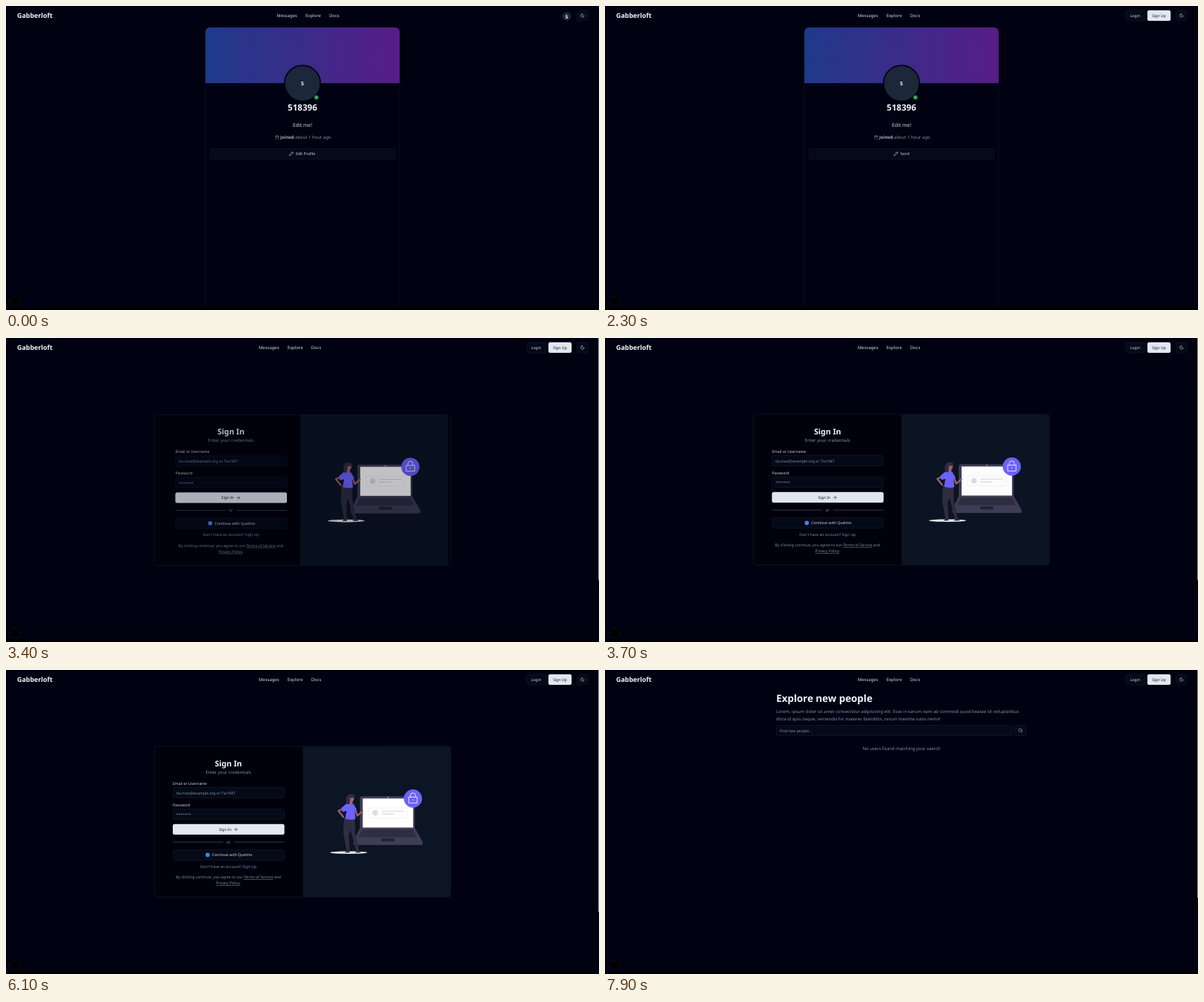
Write an HTML page that moves like this. It is 800x410 px and loops after 8 s.

```html
<!DOCTYPE html>
<html lang="en">
<head>
<meta charset="utf-8">
<title>Gabberloft</title>
<style>
html, body { margin: 0; width: 100%; height: 100%; overflow: hidden; background: #010211; }
svg { display: block; width: 100vw; height: 100vh; }
text { font: 5.93px "Noto Sans", "Open Sans", sans-serif; fill: #8290a6; text-rendering: geometricPrecision; white-space: pre; }
.mid { text-anchor: middle; }
.xs { font-size: 5.13px; }
.md { font-size: 5.15px; font-weight: 500; }
.bold { font-weight: 700; fill: #f4f7fb; }
.lite { fill: #d3d8e2; }
.dark { fill: #141b2c; }
.dim { fill: #66738a; }
.line { text-decoration: underline; }
.box { fill: #050a18; stroke: #141c2e; stroke-width: .6; }
.pale { fill: #e2e8f0; }
.icon { fill: none; stroke: #d3d8e2; stroke-width: 2; stroke-linecap: round; stroke-linejoin: round; }
</style>
</head>
<body>
<svg viewBox="0 0 800 410" preserveAspectRatio="none">
  <defs>
    <linearGradient id="cover"><stop stop-color="#1e3a8a"/><stop offset="1" stop-color="#581c87"/></linearGradient>
    <path id="pencil" class="icon" d="M17 3a2.85 2.83 0 1 1 4 4L7.500 20.500 2 22l1.500-5.500ZM15 5l4 4"/>
  </defs>
  <rect width="800" height="410" fill="#010211"/>

  <g id="profile">
    <path d="M269 410V35a6 6 0 0 1 6-6H525a6 6 0 0 1 6 6V410" fill="none" stroke="#0c1222" stroke-width=".8"/>
    <path d="M269 104V35a6 6 0 0 1 6-6H525a6 6 0 0 1 6 6V104Z" fill="url(#cover)"/>
    <circle cx="400" cy="104.300" r="24.200" fill="#1c2839" stroke="#010211" stroke-width="1.700"/>
    <text class="bold mid" x="400" y="106.800" style="font-size:6.8px">5</text>
    <circle cx="418.700" cy="123.300" r="3" fill="#22b858" stroke="#010211" stroke-width=".6"/>
    <text class="bold mid" x="400" y="141" style="font-size:11.6px">518396</text>
    <text class="mid lite" x="400" y="162.500" style="font-size:6.8px">Edit me!</text>
    <g class="icon" transform="translate(363 174.200) scale(.23)" style="stroke:#8290a6">
      <rect x="3" y="4" width="18" height="18" rx="2"/><path d="M3 10h18M8 2v4M16 2v4"/>
    </g>
    <text x="370" y="179"><tspan font-weight="600" fill="#a4afc0">Joined</tspan> about 1 hour ago</text>
    <rect class="box" x="275.500" y="192.500" width="249.300" height="14" rx="2.500"/>
    <g id="edit">
      <use href="#pencil" transform="translate(381.700 196.200) scale(.265)"/>
      <text class="md lite" x="391" y="201.300">Edit Profile</text>
    </g>
    <g id="send">
      <use href="#pencil" transform="translate(389.300 196.200) scale(.265)"/>
      <text class="md lite" x="398.500" y="201.300">Send</text>
    </g>
  </g>

  <g id="login">
    <rect x="200.300" y="103" width="399.700" height="203.300" rx="4" fill="#01010b" stroke="#131a2a" stroke-width=".7"/>
    <g id="form">
      <text class="bold mid" x="300" y="130" style="font-size:10.6px">Sign In</text>
      <text class="mid" x="300" y="139.700">Enter your credentials</text>
      <text class="xs lite" x="225" y="154.700">Email or Username</text>
      <rect class="box" x="225.200" y="158.500" width="150.300" height="14" rx="2.500"/>
      <text class="xs" x="229.700" y="167.800">tia.moe@example.org or Tia1987</text>
      <text class="xs lite" x="225" y="183.800">Password</text>
      <rect class="box" x="225.200" y="187.500" width="150.300" height="14" rx="2.500"/>
      <text class="xs" x="229.700" y="197.300">*******</text>
      <rect class="pale" x="225" y="207.800" width="150.600" height="14.300" rx="2.500"/>
      <text class="md dark" x="287.200" y="217">Sign In</text>
      <path class="icon" d="M5 12h14m-7-7 7 7-7 7" transform="translate(306.500 211.700) scale(.28)" style="stroke:#141b2c"/>
      <path d="M225 232.100H293M307.700 232.100H375.600" stroke="#4a5160" stroke-width=".7"/>
      <text class="xs mid" x="300" y="234">or</text>
      <g id="social">
        <rect class="box" x="225.200" y="242.500" width="150.300" height="14" rx="2.500"/>
        <circle cx="272" cy="249.400" r="2.800" fill="#4285f4"/>
        <text class="md lite" x="278" y="251.300">Continue with Quelmo</text>
      </g>
      <text class="xs mid" x="300" y="267">Don't have an account? <tspan fill="#5597e6">Sign Up</tspan></text>
      <text class="xs mid" x="300" y="281.300">By clicking continue, you agree to our <tspan class="line">Terms of Service</tspan> and</text>
      <text class="xs mid" x="300" y="289.300"><tspan class="line">Privacy Policy</tspan>.</text>
    </g>
    <g id="art">
      <path d="M400.300 103.300H596a4 4 0 0 1 4 4V302a4 4 0 0 1-4 4H400.300Z" fill="#0c1523"/>
      <ellipse cx="462.300" cy="246.200" rx="25" ry="1.800" fill="#e6e6e6"/>
      <!-- laptop -->
      <rect x="477.500" y="170.300" width="74" height="45" rx="3" fill="#3f3d56"/>
      <rect x="481.300" y="173.300" width="68" height="39.200" fill="#fff"/>
      <circle cx="515.300" cy="171.800" r=".7" fill="#e6e6e6"/>
      <path d="M477.500 213H551.500L562.300 232V234.500Q562.300 236 560.500 236H470.500Q468.700 236 468.700 234.500V232Z" fill="#3f3d56"/>
      <path d="M480.500 215H549L554.500 225.500H475.500Z" fill="#2f2e41"/>
      <rect x="506.500" y="227" width="17.500" height="4.300" rx="1" fill="#252434"/>
      <rect x="489.300" y="186" width="52" height="13.500" fill="#fff" stroke="#e9e9e9" stroke-width=".5"/>
      <circle cx="498" cy="192.600" r="3.800" fill="#dedede"/>
      <path d="M506.500 190.300H537M506.500 194H523" stroke="#dedede" stroke-width="1.300"/>
      <!-- lock -->
      <circle cx="549" cy="173.400" r="12.300" fill="#6c63ff"/>
      <g fill="none" stroke="#fff" stroke-width=".8">
        <rect x="543.300" y="171.500" width="11.400" height="7.800"/>
        <path d="M545.600 171.500V169.200a3.400 3.400 0 0 1 6.800 0V171.500M549 174.300V176"/>
      </g>
      <!-- woman -->
      <g fill="none" stroke="#a0616a" stroke-width="2.300" stroke-linecap="round" stroke-linejoin="round">
        <path d="M470.500 187L474 196.500L481 190.500"/>
        <path d="M457 186L448.500 190L455 198"/>
      </g>
      <path d="M456 199L455 219L459.500 244L457 246.300H463.500L462.500 222L465 216L472.500 244.500L471 246.300H479L476 243L471 219L470.500 199Z" fill="#2f2e41"/>
      <path d="M459.500 180Q464 178 469 181L473 188L470.500 190.500L471.500 201Q465 203 457.500 200.500L459.500 190L454 191.500L452.500 186Z" fill="#6c63ff"/>
      <path d="M462.500 175H467.500V181H463.500Z" fill="#a0616a"/>
      <circle cx="465.300" cy="173.700" r="4.200" fill="#a0616a"/>
      <path d="M459.500 181Q457.500 175 459.800 170.500Q463.500 165.300 469 168.300Q471.500 170.500 469.500 172.300L464 172.500Q464.500 177 463 181Z" fill="#2f2e41"/>
    </g>
  </g>

  <g id="explore">
    <text class="bold" x="231" y="42.500" style="font-size:13.4px">Explore new people</text>
    <text x="231" y="58.200">Lorem, ipsum dolor sit amet consectetur adipisicing elit. Esse in earum nam ad commodi quod beatae sit voluptatibus</text>
    <text x="231" y="67.600">dicta id quis itaque, reiciendis hic maiores blanditiis, rerum maxime iusto nemo!</text>
    <rect class="box" x="231.300" y="74.500" width="318.500" height="14" rx="2.500"/>
    <text class="xs" x="235.700" y="83.500">Find new people...</text>
    <rect class="box" x="552.500" y="74.500" width="16" height="14" rx="2.500"/>
    <path class="icon" d="M19 11a8 8 0 1 0-16 0a8 8 0 0 0 16 0M21 21l-4.300-4.300" transform="translate(557.400 78.300) scale(.26)"/>
    <text class="mid" x="400" y="108.200">No users found matching your search</text>
  </g>

  <text class="bold" x="15" y="16" style="font-size:8.9px">Gabberloft</text>
  <g id="nav">
    <text class="lite" x="341" y="15">Messages</text>
    <text class="lite" x="379.700" y="15">Explore</text>
    <text class="lite" x="411.700" y="15">Docs</text>
  </g>
  <g id="member">
    <circle cx="756.500" cy="14" r="5.800" fill="#1c2839"/>
    <text class="bold mid" x="756.500" y="16.700" style="font-size:6.6px">5</text>
  </g>
  <g id="guest">
    <rect class="box" x="702.300" y="6" width="26.500" height="13.800" rx="2.500"/>
    <text class="md lite mid" x="715.300" y="14.800">Login</text>
    <rect class="pale" x="731.700" y="5.700" width="31.300" height="14.300" rx="2.500"/>
    <text class="md dark mid" x="747.300" y="14.800">Sign Up</text>
  </g>
  <rect class="box" x="770.500" y="6" width="14.300" height="13.800" rx="2.500"/>
  <path class="icon" d="M12 3a6 6 0 0 0 9 9 9 9 0 1 1-9-9Z" transform="translate(774.500 9.700) scale(.265)"/>

  <g id="menu">
    <rect class="box" x="730.300" y="24" width="52.400" height="67" rx="2.500"/>
    <rect id="hover" x="732" y="76" width="49" height="13" rx="1.500" fill="#172033"/>
    <text class="md lite" x="736" y="34.700">518396</text>
    <path d="M730.500 40.500H782.500M730.500 73.500H782.500" stroke="#141c2e" stroke-width=".6"/>
    <text class="xs lite" x="736" y="51.300">Profile</text>
    <text class="xs lite" x="736" y="65.300">Settings</text>
    <text class="xs lite" x="736" y="84.300">Log out</text>
  </g>

  <rect y="406" width="800" height="4"/>
  <circle cx="12.500" cy="398" r="6.600" stroke="#15171f" stroke-width=".6"/>
  <rect id="bar" x="799" width="1" height="307" fill="#9a9ca3"/>
</svg>
<script>
const $ = id => document.getElementById(id);
const ramp = (t, from, to) => Math.min(1, Math.max(0, (t - from) / (to - from)));
const out = u => 1 - (1 - u) ** 2;
const show = (id, on) => $(id).setAttribute("opacity", +on);
const move = (id, x, y = 0) => $(id).setAttribute("transform", `translate(${x} ${y})`);

function draw(now) {
  const t = now % 8000;
  const guest = t >= 2280, login = t >= 2880 && t < 7700, explore = t >= 7700;

  show("profile", t < 2880);
  show("edit", !guest);
  show("send", guest);
  show("member", !guest);
  show("guest", guest);
  move("nav", guest ? 0 : 24.3);

  // account menu
  const open = out(ramp(t, 950, 1200)) * (1 - ramp(t, 2150, 2280));
  show("menu", open);
  move("menu", 0, -3 * (1 - out(ramp(t, 950, 1200))));
  show("hover", t >= 1500);

  // the card rises while its halves slide apart
  const rise = out(ramp(t, 2850, 3550)), slide = out(ramp(t, 2920, 3800));
  show("login", login && rise);
  move("login", 0, 8.3 * (1 - rise));
  show("form", slide);
  move("form", 16.7 * (1 - slide));
  show("art", slide);
  move("art", -16.7 * (1 - slide));

  const grow = 1 + .05 * (out(ramp(t, 5130, 5300)) - out(ramp(t, 5860, 6100)));
  $("social").setAttribute("transform", `translate(300.3 249.5) scale(${grow}) translate(-300.3 -249.5)`);

  show("explore", explore);
  show("bar", login || explore || ramp(t, 150, 500) * (1 - ramp(t, 950, 1200)));
  $("bar").setAttribute("height", login ? 326 : 307);
  requestAnimationFrame(draw);
}
draw(performance.now());
</script>
</body>
</html>
```
